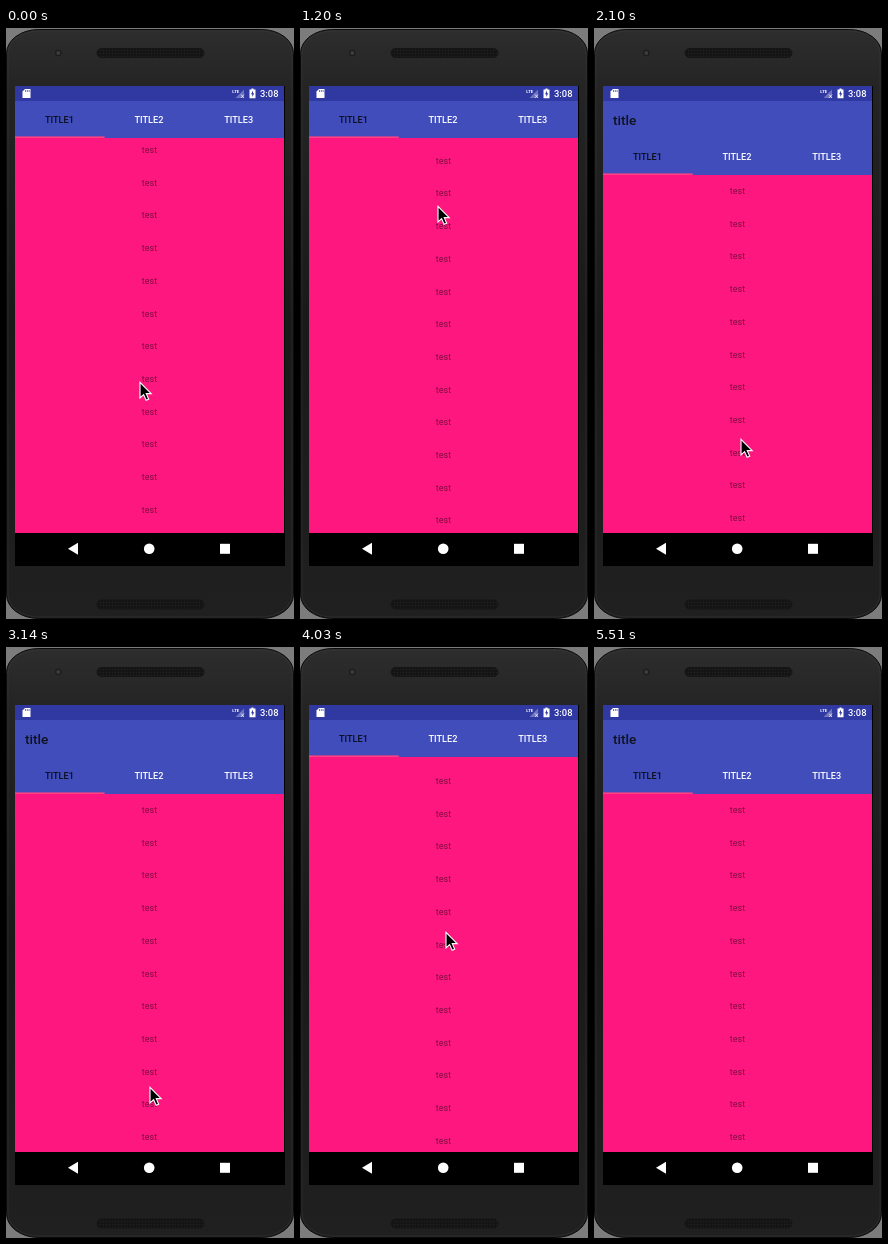
An HTML page that plays this animation: 288x591 px, repeating every 5810 ms.

```html
<!DOCTYPE html>
<html lang="en">
<head>
<meta charset="utf-8">
<title>Tabs with a hiding toolbar</title>
<style>
  html, body { margin: 0; width: 100%; height: 100%; overflow: hidden; background: #7c7c7c; }
  svg { display: block; width: 288px; height: 591px; font-family: Roboto, sans-serif; }
  .tab { font-size: 9.2px; font-weight: 500; text-anchor: middle; fill: #fff; }
  .row { font-size: 9px; text-anchor: middle; fill: #000; fill-opacity: .5; }
</style>
</head>
<body>
<svg viewBox="0 0 288 591">
  <defs>
    <linearGradient id="body" x2="0" y2="1">
      <stop offset="0" stop-color="#2d2d2d"/>
      <stop offset=".1" stop-color="#242424"/>
      <stop offset=".5" stop-color="#191919"/>
      <stop offset="1" stop-color="#202020"/>
    </linearGradient>
    <pattern id="mesh" width="3" height="3" patternUnits="userSpaceOnUse">
      <rect width="3" height="3" fill="#141414"/>
      <circle cx="1.5" cy="1.5" r=".7" fill="#222"/>
    </pattern>
    <clipPath id="listClip"><rect id="listBox" x="9" width="269" height="395"/></clipPath>
  </defs>

  <rect x=".5" y="1.5" width="287" height="589" rx="32" ry="24" fill="url(#body)" stroke="#0b0b0b"/>
  <rect x="2" y="3" width="284" height="586" rx="31" ry="23" fill="none" stroke="#444" stroke-opacity=".35"/>
  <rect x="91" y="20.5" width="107" height="9" rx="4.5" fill="url(#mesh)" stroke="#151515"/>
  <rect x="91" y="572" width="107" height="9" rx="4.5" fill="url(#mesh)" stroke="#151515"/>
  <circle cx="52.3" cy="25" r="4" fill="#1c1c1c" stroke="#2c2c2c"/>
  <circle cx="52.3" cy="25" r="2" fill="#3a3d3f"/>

  <rect x="9" y="58" width="270" height="480"/>
  <rect x="9" y="73" width="269" height="432" fill="#ff1780"/>
  <g id="rows" clip-path="url(#listClip)"></g>
  <rect id="header" x="9" y="73" width="269" fill="#404dbb"/>
  <text id="title" x="19" y="96.7" font-size="13.6" font-weight="500" fill="#10131f">title</text>
  <g id="tabs">
    <text class="tab" x="53.5" y="95.2" style="fill:#0b0d18">TITLE1</text>
    <text class="tab" x="143" y="95.2">TITLE2</text>
    <text class="tab" x="232.7" y="95.2">TITLE3</text>
    <rect x="9" y="108.4" width="89.6" height="1.6" fill="#ff4081"/>
  </g>

  <rect x="9" y="58" width="269" height="15" fill="#3039a2"/>
  <g fill="#fff">
    <path d="M19 61h5.5v9h-8v-6.5z"/>
    <path d="M19.5 62v2M21.3 62v2M23.1 62v2" stroke="#3039a2" stroke-width=".7"/>
    <text x="226.3" y="65.3" font-size="4.3" font-weight="700">LTE</text>
    <path d="M238 61.5v8.5h-8.5z" fill-opacity=".3"/>
    <path d="M235 66.5l3 3.5M238 66.5l-3 3.5" stroke="#fff" stroke-width=".7"/>
    <path d="M245.5 60.5h2v1h2v8.8h-6v-8.8h2z"/>
    <path d="M247 62.5l-2 3.8h1.3v2.7l2-3.8H247z" fill="#3039a2"/>
    <text x="254" y="69.2" font-size="9.4" font-weight="500">3:08</text>
    <path d="M62 520.8l10-6v12z"/>
    <circle cx="143.2" cy="520.8" r="5.3"/>
    <rect x="214" y="515.8" width="10" height="10"/>
  </g>
  <path id="cursor" d="M0 0V15.6L3.6 12.3L6.1 18L8.7 16.9L6.3 11.3H11.2Z"
        stroke="#fff" stroke-width="1.1"/>
</svg>
<script>
const $ = id => document.getElementById(id);
const LOOP = 5810, ROW = 32.7, TOOLBAR = 37;

// [step, cursor x, cursor y, list scroll, smooth motion towards the next key]
const keys = [
  [0, 134, 354.3, 36.7, true],
  [8, 138, 178.3, 222.2, true],
  [14, 147, 411.3, 32.7, false],
  [15, 147, 411.3, 14.5, false],
  [16, 147, 411.3, 4, false],
  [17, 147, 411.3, 0, false],
  [19, 145.5, 426, 0, false],
  [21, 144, 440.3, 0, true],
  [27, 146, 285.3, 122.8, false],
  [30, 146, 374.3, 71.9, false],
  [32, 147.5, 446, 0, false],
  [34, 199.5, 526.5, 0, false],
  [36, 240, 575, 0, false],
  [39, 250, 600, 0, false]
];

for (let i = 0; i < 14; i++) {
  const row = document.createElementNS("http://www.w3.org/2000/svg", "text");
  row.setAttribute("class", "row");
  row.setAttribute("x", 143.5);
  row.textContent = "test";
  $("rows").append(row);
}
const rows = [...$("rows").children];

const stepStart = k => 150 * k - 10 * Math.max(0, Math.floor((k - 10) / 6.6));

function stepAt(time) {
  let k = 0;
  while (stepStart(k + 1) <= time) k++;
  return k;
}

function poseAt(step) {
  const n = keys.findIndex(key => key[0] > step);
  const a = keys[n - 1], b = keys[n];
  let u = (step - a[0]) / (b[0] - a[0]);
  if (a[4]) u = u * u * (3 - 2 * u);
  return [1, 2, 3].map(i => a[i] + (b[i] - a[i]) * u);
}

function draw(time) {
  const step = stepAt(time);
  const [x, y, scroll] = poseAt(step);
  const open = (step >= 10 && step < 23) || step >= 29;
  const shift = open ? TOOLBAR : 0;
  const top = 110 + shift;
  const first = top + 19 - scroll % ROW;

  $("header").setAttribute("height", 37 + shift);
  $("tabs").setAttribute("transform", `translate(0 ${shift})`);
  $("title").style.display = open ? "" : "none";
  $("listBox").setAttribute("y", top);
  $("listBox").setAttribute("height", 505 - top);
  // One extra row above covers the part scrolled under the tabs
  rows.forEach((row, i) => row.setAttribute("y", first + (i - 1) * ROW));
  $("cursor").setAttribute("transform", `translate(${x} ${y})`);
  $("cursor").style.display = step < 37 ? "" : "none";
}

function frame() {
  draw(performance.now() % LOOP);
  requestAnimationFrame(frame);
}
frame();
</script>
</body>
</html>
```
